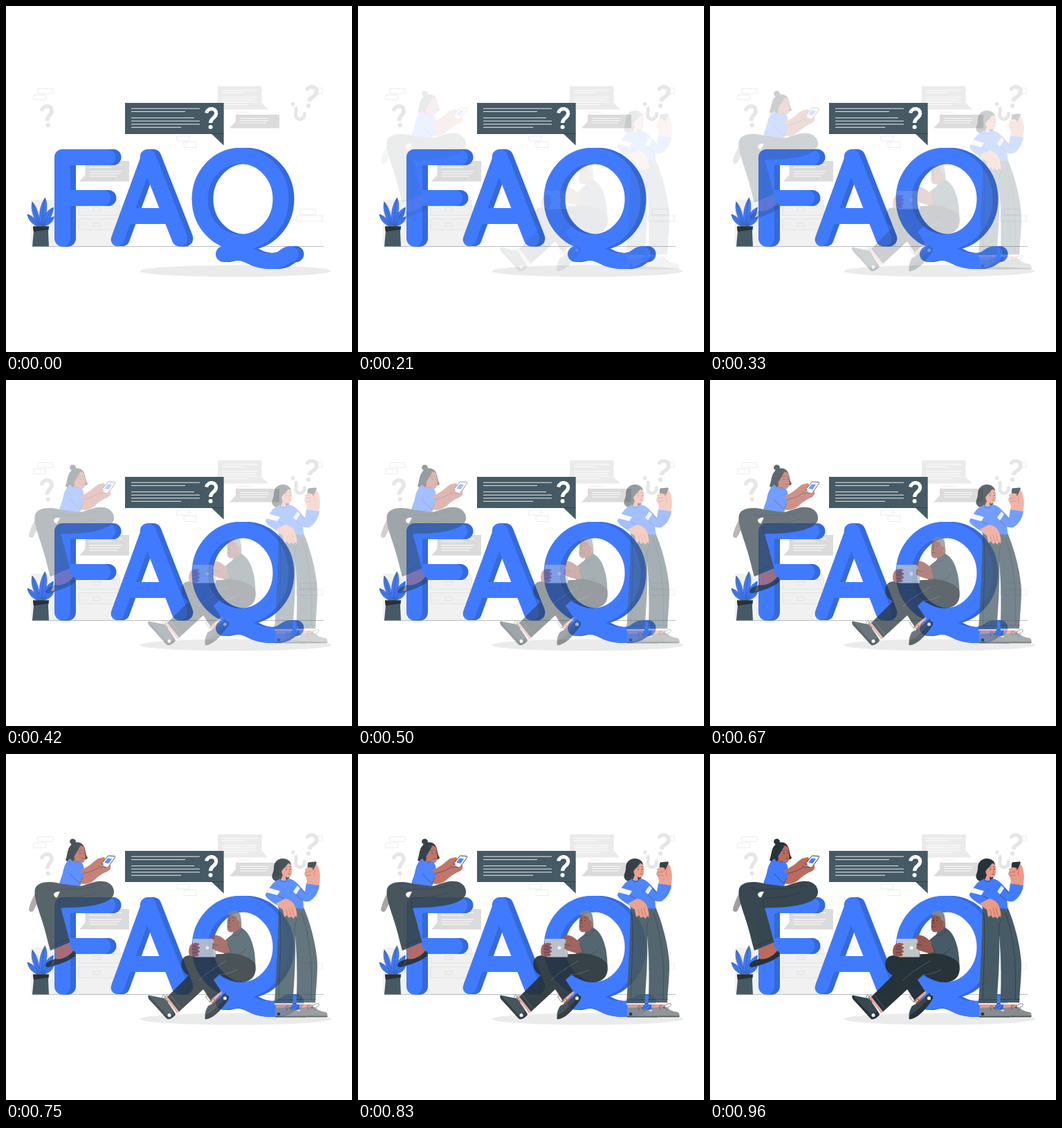
Animation of 500x500 px, one loop 1 s. Source, as an HTML page:

```html
<!DOCTYPE html>
<html lang="en">
<head>
<meta charset="utf-8">
<title>FAQ</title>
<style>
html, body { margin: 0; width: 100%; height: 100%; overflow: hidden; background: #fff; }
svg { display: block; width: 100vw; height: 100vh; }
.line { fill: none; stroke-linecap: round; stroke-linejoin: round; }
.thin { fill: none; stroke: #263238; stroke-width: .6; stroke-linecap: round; stroke-linejoin: round; }
.pale { stroke: #6c797e; }
.warm { stroke: #a9584d; }
.rule { fill: none; stroke: #fff; stroke-width: .9; }
.box { fill: none; stroke: #e9e9e9; stroke-width: .8; }
.butt { stroke-linecap: butt; }
.blue { fill: #407bff; }
.dark { fill: #263238; }
.slate { fill: #455a64; }
.navy { fill: #37474f; }
.tan { fill: #bd6a5d; }
.brown { fill: #985850; }
.rose { fill: #eb9a88; }
.people { animation: appear 1s infinite; }
@keyframes appear {
  0%, 2.5% { opacity: 0; animation-timing-function: cubic-bezier(.333, 0, .667, 1); }
  100% { opacity: 1; }
}
</style>
</head>
<body>
<svg viewBox="0 0 500 500">
  <defs>
    <g id="ask">
      <path class="line butt" stroke="currentColor" stroke-width="4.6" d="M-6.3 -6.800C-5 -14.400 6.400 -13.800 6.200 -6.200C6 0 -1 -1 -1 6"/>
      <circle cx="-1" cy="11.400" r="2.700" fill="currentColor"/>
    </g>
    <g id="letters" class="line" stroke="currentColor" stroke-width="23">
      <path d="M81.500 336V218.500H147M81.500 277.500H140"/>
      <path stroke-width="19" d="M161 337.500L205 217"/>
      <path d="M205 218.500L251 336"/>
      <path class="butt" d="M180 303.500H238"/>
      <ellipse cx="338.500" cy="279" rx="58.500" ry="62.500"/>
      <path d="M314.500 358.500C334 353 345 357 355 362.500C366 368.500 382 370 394 367C402 364.500 404 358.500 411 358.500"/>
    </g>
    <g id="side" color="#3669d9">
      <use href="#letters" x="8"/><use href="#letters" x="6"/><use href="#letters" x="4"/><use href="#letters" x="2"/>
    </g>
  </defs>

  <!-- backdrop -->
  <path class="box" d="M46 119.500h22v7h-22zM39.500 128.500h18v7h-18zM445 118.500h12v8h-12zM425 293.500h23v8h-23zM420 303h37v8h-37zM247 188h18v7h-18zM257 196.500h18v8h-18zM335 153.500h18v5h-18z"/>
  <rect x="36" y="280" width="129" height="67" fill="#f1f1f1"/>
  <path d="M105 288.500h60v14h-60zM105 307.500h60v16h-60zM126 291.500h10v5h-10zM126 313.500h10v5h-10z" fill="#f0f0f0" stroke="#e0e0e0" stroke-width=".8"/>
  <use href="#ask" transform="translate(60 159) rotate(-8) scale(1.17)" color="#e6e6e6"/>
  <use href="#ask" transform="translate(440.500 131) rotate(10) scale(1.17)" color="#e6e6e6"/>
  <use href="#ask" transform="translate(421 152) rotate(143) scale(1.05)" color="#e6e6e6"/>
  <path d="M306 116H369.500V140L378.500 149.500H306z" fill="#ebebeb"/>
  <path class="rule" d="M312 122h52M312 125.500h32M312 132h52M312 135.500h48M312 139h52M312 142.500h38"/>
  <path d="M332 157H395V176.500H323L332 167z" fill="#dbdbdb"/>
  <path class="rule" d="M338 162.500h41M338 165.500h41M338 169h38"/>
  <path d="M114.500 224H178V253.500H106L114.500 244z" fill="#dbdbdb"/>
  <path class="rule" d="M120.500 229.500h47M120.500 233h32M120.500 239h47M120.500 242.500h44M120.500 246h40"/>
  <path d="M38 347.500H459" stroke="#9aa1a4" stroke-width=".7"/>
  <ellipse cx="331.500" cy="383" rx="138" ry="8.500" fill="#ebebeb"/>

  <!-- main bubble -->
  <path class="slate" d="M172 140H314.700V201.500L297 184.700H172z"/>
  <path d="M172 184.500H314.700" stroke="#263238" stroke-width=".6"/>
  <path class="rule" d="M181 148.200h99M181 152.600h78M181 161.700h91M181 166.200h99M181 170.800h99M181 175.300h72"/>
  <use href="#ask" transform="translate(296.700 162.300) scale(1.12)" color="#fff"/>

  <!-- letters -->
  <use href="#side"/>
  <use href="#letters" color="#407bff"/>

  <!-- plant -->
  <g class="blue" stroke="#263238" stroke-width=".4">
    <path d="M48.500 319C40 308 35 294 38 283C46 292 49 306 48.500 319z"/>
    <path d="M50 319C46 304 49 288 56.500 277C62 289 58 306 50 319z"/>
    <path d="M51.500 319C53 304 59 295 68.500 291C68 304 61 312 51.500 319z"/>
    <path d="M47 319C38 316 32 309 31 301C40 304 45 310 47 319z"/>
    <path d="M53 319C57 311 62 306 69.500 304.500C68 313 61 317 53 319z"/>
    <path fill="none" d="M38 284L49 319M56 278L50 319M68 292L51 319M31 301L47 319M69 305L53 319"/>
  </g>
  <path class="slate" d="M39 318.500H62L61 326L62 347.500H38L40 326z"/>
  <path class="dark" d="M39 318.500H62L61.500 323L39.800 326z"/>

  <g class="people">
    <!-- seated on the F -->
    <g>
      <path d="M48 194C40 203 36 213 33 224C33 229 38 229 40 226C45 215 51 206 57 200z" fill="#a39c9b"/>
      <path class="dark" d="M94 131.500C88 137 89 147 86 153C89 157 94 158 99 157L113 153C118 152 119 150 117 148C114 143 116 128 103 127.500C99 127.500 95 129 94 131.500z"/>
      <ellipse class="dark" cx="96.500" cy="126.500" rx="4.400" ry="4"/>
      <path class="tan" d="M100 139C101 131 111 130 113.500 137C115 145 116 156 110 157.500C108 158 106 157 105 156L104 163L94 159L99 152C98 147 99 143 100 139z"/>
      <path class="dark" d="M98.500 148C98 138 100 133 108 132C105 137 102 142 98.500 148z"/>
      <path class="thin" d="M105 140l3-1M111 139.500l2 .5M109 151q2-1 3.500 0"/>
      <circle class="dark" cx="107" cy="143.500" r=".8"/><circle class="dark" cx="112.500" cy="143" r=".8"/>
      <path class="thin warm" d="M111 143.500l2 4-2 .4"/>
      <path class="blue" d="M93 151C87 155 84 161 82 172C80 180 77 184 77 190L107 192C109 184 112 176 112.500 168C113 160 110 156 105 155C100 159 96 156 93 151z"/>
      <path class="tan" d="M109 167C118 164 125 157 133 151L142 149L145 157L149 157.500C152 160 151 166 148 169C140 172 134 176 128 182C120 189 111 189 104 186L97 177z"/>
      <path d="M147.500 147L157 147.700Q158.500 148 157.500 149.500L148 163Q147 164.300 145.500 164L138 162Q136 161.500 137 160z" fill="#fff" stroke="#263238" stroke-width="1"/>
      <path class="blue" d="M147 150.500l6 .8-4.500 6.700-6.500-1z"/>
      <path class="tan" d="M132 154L139 155L141 159L137 165L131 163zM147 163L151 159L151 166L147 169L144 165z"/>
      <path class="thin" d="M109 173C118 172 126 169 134 164M137 158l5 4M134 162l5 3"/>
      <path class="blue" d="M91 158C86 165 92 178 107 187L113 174C108 170 104 164 99 159z"/>
      <path class="thin" d="M93 173q6 8 14 14l4-8M97 152q3 6 8 3.500"/>
      <path class="tan" d="M69 282L91 273C93 279 95 283 98 286L86 298L70 300C73 294 72 288 69 282z"/>
      <path class="dark" d="M57 305C59 299 66 298 71 296C78 298 90 294 97 284.500C101 285 101.500 290 99.500 292.500C89 300 75 305 61 308C58 308 56 307 57 305z"/>
      <path class="navy" d="M77 187C61 183 45 185 42 195C39 207 49 229 54 247C59 264 61 274 64 284L92.500 272C88 254 83 236 79 222.500C97 222 122 222 143 214C155 209 158 202 155 194C152 186 143 183 133 184C123 185 115 190 106 191z"/>
      <path d="M69 202C71 199 75 198 78 199L74 207C71 208 69 205 69 202z" fill="#f1f1f1"/>
      <path class="thin" d="M78 209C92 206 111 208 129 201M78 210C75 216 77 219 79 223M60 193C68 197 75 197 83 195C99 196 116 195 132 190M66 277l23-9"/>
    </g>

    <!-- seated inside the Q -->
    <g>
      <path class="brown" d="M322 233C319 239 320 244 319.500 248C319 255 322 259 328 257L328 265L345 260L340 250C342 242 337 231 329 230C326 230 324 231 322 233z"/>
      <path d="M321 233C321 225.500 337 223 339 234C340.500 241 340 247 338 250L336 241L333.500 239L333 235C328 233 324 232 321 233z" fill="#84898b"/>
      <path class="thin" d="M321 237.500l3-.8M327 236.500l3 .6M321 249.500q2-.8 4 .4M323.500 239l-1.500 6 1.800.3"/>
      <circle class="dark" cx="322.500" cy="240.500" r=".8"/><circle class="dark" cx="328" cy="240.500" r=".8"/>
      <circle class="brown" cx="336" cy="243.500" r="2.500"/>
      <path class="slate" d="M328 259L340 251C350 256 355 268 358 281C360 292 361 302 360 310L318 304L315 288C319 276 322 266 328 259z"/>
      <path class="brown" d="M325 262L316 270L306 262.500C302 261 297 262 295 265L301 268L297 272L300 283L312 287C319 289 326 285 330 280z"/>
      <path class="slate" d="M329 260L318 268L326 291C336 292 347 287 347 278C347 268 338 260 329 260z"/>
      <path class="thin" d="M319 270l7 20c10 1 18-3 21-9M329 263q8 0 12-9"/>
      <path class="dark" d="M360 303C363 316 358 328 342 330C327 330 318 325 308 319L250 372.500L233 351L264 320C251 313 250 297 260 292C278 287 301 291 321 288C337 288 354 294 360 303z"/>
      <path class="dark" d="M276 326L296 357L311 343L297 322z"/>
      <path class="thin pale" d="M318 299C304 308 288 317 279 327M333 312C325 316 317 319 308 319M237 348l16 20"/>
      <path d="M233 351L250 372.500L247.500 375L230 353z" fill="#e7a59b"/>
      <path d="M294 357L311 342.500L313 345L297 360z" fill="#e7a59b"/>
      <path class="brown" d="M230 353l5 5-5 3zM297 360l9-8 4 3-8 9z"/>
      <path class="navy" d="M206 348.500L228 353C233 357 238 364 245 375.500L234 383.500C227 378 224 372 218 364C211 358 206 354 206 348.500z"/>
      <path class="dark" d="M206 348.500C204 351 206 354 209 357L231 381C235 386 240 382 245 377L242 372L234 379z"/>
      <path class="navy" d="M288 383C287 375 288 371 292 364L298 361C305 358 311 350 317 345L322 352C314 366 302 379 288 383z"/>
      <path class="dark" d="M288 383.500C287 381 288 378 289 377C299 372 312 359 320 349C324 350 322 354 320 357C310 371 299 383 288 383.500z"/>
      <circle cx="236" cy="377.500" r="2.500" fill="#fff"/><circle cx="316.500" cy="353" r="2.500" fill="#fff"/>
      <path class="thin" d="M226 355c-1-8 3-9 4-4s-4 4 2 1c4-3 0-7-5 3M294 358c-5-5-8-10-2-8s5 9 2 8c4-4 10-6 7-1"/>
      <path d="M271 267H298.500Q300 267 300 269L303 292Q303 293.500 301 293.500H273.500Q271.700 293.500 271.500 291.500L269.500 269Q269.500 267 271 267z" fill="#c4c6c7"/>
      <path d="M298 267Q300 267 300 269L303 292Q303 293.500 301 293.500" fill="none" stroke="#8e999e"/>
      <circle cx="291" cy="280" r="2.500" fill="#fff"/>
      <path class="brown" d="M266 277C269 273 275 272 279 274C280 276 278 277 275 277L280 279C281 281 279 282 277 282L280 285C280 287 278 287.500 276 287L279 290C278 293 272 293 266 292C263 288 264 281 266 277z"/>
      <path class="brown" d="M295 266C301 261 307 261 313 266L321 272L317 286C309 285 303 285 298 281L299 274L303 269z"/>
      <path class="thin" d="M270 278h7M269 282h7M269 287h7M299 275l8 2"/>
    </g>

    <!-- standing by the Q -->
    <g>
      <path class="dark" d="M395 152C402 149 412 153 412 161L409 180C403 185 390 187 386 181C382 176 387 172 387 165C387 158 390 154 395 152z"/>
      <path class="rose" d="M399 166C400 157 410 155 412.500 162C413.500 169 414 176 409 178C406 179 405 178 404 177L405 185L396 184L400 175C398 172 398 169 399 166z"/>
      <path class="dark" d="M398.500 169C396 161 401 155 409 156C406 161 402 164 398.500 169z"/>
      <path class="thin" d="M403 164l3-1M409.500 163l2.500.5M408 173.500q1.500-1 3 0"/>
      <circle class="dark" cx="405" cy="167" r=".8"/><circle class="dark" cx="411" cy="166.500" r=".8"/>
      <path class="thin warm" d="M409 167l1.500 3.500-1.500.3"/>
      <path class="slate" d="M394 221C393 247 393 275 391 303C390 326 389 345 388 360H414.500C416 331 419 301 418 262C421 300 421 331 419.500 359L447 359.500C448 337 451 313 449.500 297C447 270 439 243 430 221z"/>
      <path class="thin" d="M418 262C416 252 418 246 420 239M395 229C399 244 396 302 394 354M427 230C439 262 443 305 441 354M388.500 355h26M419.700 354.500h28"/>
      <path d="M388 360H414V362.500H388zM419.500 359.500H446.500V362H419.500z" fill="#eee"/>
      <path class="rose" d="M390 362h22v6h-22zM424 362h20v5h-20z"/>
      <path d="M424 367L443 365C449 369 455 372 462 373C465 375 465 378 464 380.500H425z" fill="#888d8f"/>
      <path d="M389 367L412 366C417 370 424 372 430 373.500C434 375 434 378 433 380.700H389z" fill="#888d8f"/>
      <path d="M389 379.500H433.500M434 379.300H464.500" stroke="#4b5254" stroke-width="1.600"/>
      <circle class="dark" cx="394" cy="375.800" r="2.300"/>
      <path class="thin" d="M406 370c-3-8 2-7 5-2c2-7 11-11 8-5c-2 3-6 5-8 5M437 369c-4-8 1-8 5-2c2-6 12-9 10-4c-2 3-6 4-10 4M413 371l3-3M446 370l3-3"/>
      <path class="blue" d="M395 180C399 184 405 183 408 180C415 181 421 186 425 193L429 211C430 217 430 221 430 224C418 222 405 224 393 222L394 209C389 200 388 188 395 180z"/>
      <path class="blue" d="M393 182C385 185 381 193 375 203C374 208 388 216 396 221L404 210L393 205L401 192z"/>
      <path d="M380.500 193.500L396 198L392 204L376.500 200z" fill="#f5f5f5"/>
      <path class="blue" d="M412 181C420 184 427 194 432 199L434 187L453 189C452 199 446 209 438 213C430 214 423 210 418 204z"/>
      <path d="M421 190L425 194L419 203L415 199z" fill="#e8efff"/>
      <path class="thin" d="M394 205l8 4M425 194l7 7M419 203q4 6 9 8M396 182q4 5 10 1"/>
      <path class="rose" d="M390 216L403 209C410 210 416 214 418 221C420 227 421 232 420 236L417 234L416 238L412 235L409 237L406 233L402 236L400 225C396 222 393 220 390 216z"/>
      <path class="thin warm" d="M405 225l2 8M409 223l3 11M413 222l3 11"/>
      <path class="rose" d="M434 187C436 183 434 178 431 174C431 170 434 168 437 168L445 163C449 162 452 165 453 170C455 178 453 185 452 190z"/>
      <path class="dark" d="M437 156.500L447.500 155.500Q449 155.500 448.700 157L446 167L435.500 168L436 158z"/>
      <path class="rose" d="M448 159C451 160 452 165 453 170L448 177L439 174L445 166zM432 166L438 163.500L444 165L441 169L433 171zM432 171L440 169L443 174L433 176z"/>
      <path class="thin warm" d="M433 171l8-1M433 176l8-1M446 168q-2 4 0 8"/>
    </g>
  </g>
</svg>
</body>
</html>
```
